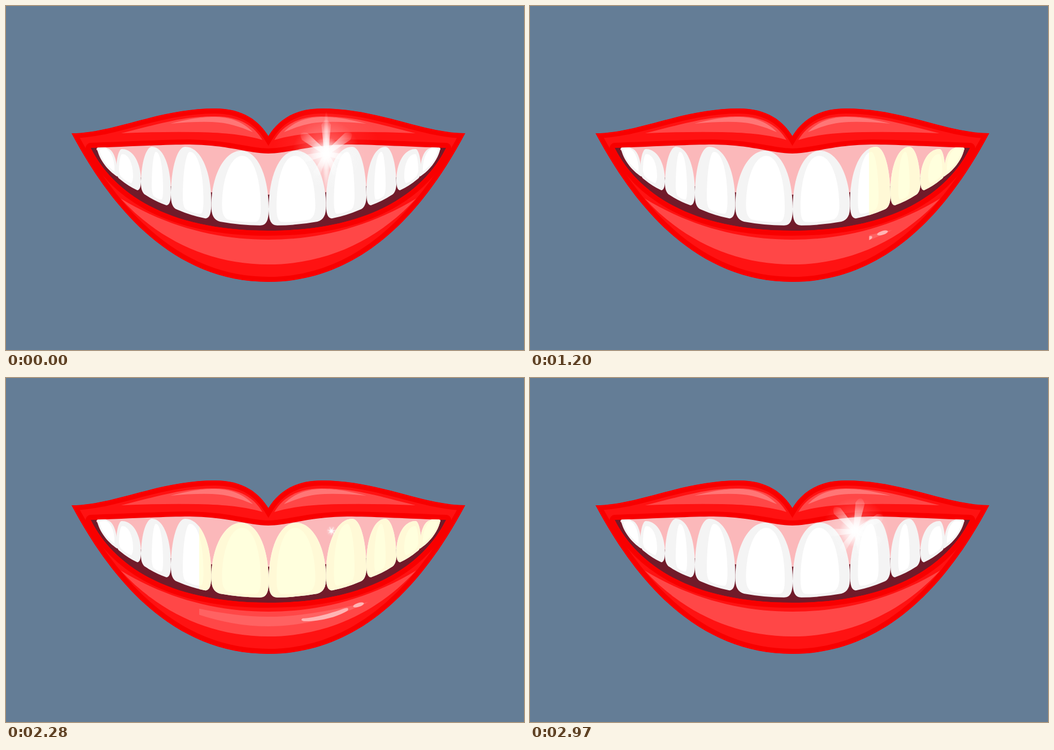
An HTML page for the animation above (3000 ms loop, 917 by 611 pixels).

```html
<!DOCTYPE html>
<html lang="en">
<head>
<meta charset="utf-8">
<title>Smile</title>
<style>
html, body { margin: 0; width: 100%; height: 100%; overflow: hidden; background: #647d96; }
svg { display: block; width: 100%; height: 100%; }
</style>
</head>
<body>
<svg id="stage" viewBox="0 0 917 611" preserveAspectRatio="none"></svg>
<script>
const LOOP = 3000, STEP = 30, CENTER = 464.5;

const fill = (color, d, extra = '') => `<path fill="${color}" d="${d}" ${extra}/>`;
const both = (shape, axis = CENTER) => `${shape}<g transform="translate(${2 * axis} 0) scale(-1 1)">${shape}</g>`;
const flip = ([x, y]) => [2 * CENTER - x, y];
const curve = ([first, ...rest]) => `M${first} C${rest.join(' ')}Z`;

// Closed shape, alike left and right, from the left halves of its upper and lower edge.
function symmetric(top, bottom) {
  const whole = half => [...half, ...half.slice(0, -1).reverse().map(flip)];
  return curve([...whole(top), ...whole(bottom).reverse().slice(1)]);
}

const LIPS = symmetric(
  [[116, 226], [190, 226], [270, 182], [370, 182], [420, 182], [448, 204], [CENTER, 231]],
  [[116, 226], [187, 360], [296, 490], [CENTER, 490]]);
const MOUTH = symmetric(
  [[150, 252], [215, 250], [280, 246], [325, 246], [395, 247], [430, 262], [CENTER, 262]],
  [[150, 252], [186, 324], [274, 399], [CENTER, 399]]);
const GLOSS = symmetric(
  [[203, 342], [290, 395], [380, 415], [CENTER, 415]],
  [[203, 342], [270, 415], [360, 459], [CENTER, 459]]);
const BAND = symmetric(
  [[288, 398], [345, 411], [405, 424], [CENTER, 424]],
  [[288, 398], [335, 422], [400, 441], [CENTER, 441]]);
const GUMS = symmetric(
  [[160, 255], [160, 235], [300, 235], [CENTER, 235]],
  [[160, 255], [230, 330], [380, 335], [CENTER, 335]]);

// Height of the biting edge at x.
const bite = x => 390 - .00039 * Math.abs(465 - x) ** 2.2;

function tooth(l, r, apex, top, lift) {
  const w = r - l, ax = l + w * apex;
  const side = (x, inward) => {
    const foot = x + inward * w * .15, low = bite(foot) - lift;
    return { x, foot, low, near: x + inward * w * .04, hip: low - (low - top) * .22, mid: low - (low - top) * .66 };
  };
  const a = side(l, 1), b = side(r, -1);
  return `M${l},${a.hip} C${l},${a.mid} ${l + (ax - l) * .45},${top} ${ax},${top} ` +
    `C${ax + (r - ax) * .6},${top} ${r},${b.mid} ${r},${b.hip} ` +
    `C${r},${b.low - 9} ${b.near},${b.low} ${b.foot},${b.low} ` +
    `Q${(l + r) / 2},${(a.low + b.low) / 2 + 3} ${a.foot},${a.low} ` +
    `C${a.near},${a.low - 3} ${l},${a.low - 12} ${l},${a.hip}Z`;
}

// left, apex as part of the width, top, inset of the face
const TEETH = [[195, .23, 254, 5], [239, .37, 250, 19], [292, .35, 250, 21], [363.500, .52, 257, 19]];

function teeth(edge, face) {
  const row = TEETH.map(([l, apex, top, inset], i) => {
    const r = TEETH[i + 1]?.[0] ?? 465;
    return fill(edge, tooth(l, r, apex, top, 0)) + fill(face, tooth(l + inset, r - 14, apex, top + 9, 6));
  }).join('');
  const last =
    fill(edge, 'M161,253 C165,273 180,292 197,303 C198,280 192,256 180,253 C170,248 163,249 161,253Z') +
    fill(face, 'M165,255 C168,272 180,285 192,294 C193,275 186,255 175,253Z');
  return both(last + row, 465);
}

const upperGloss = both(
  fill('#ff4747', 'M204,226 C270,210 310,196 370,196 C415,196 440,214 454,238 C425,229 390,225 340,224 Q270,223 204,226Z') +
  fill('#ff7676', 'M291,209 C335,198 350,197 372,197 C405,198 425,211 437,224 C413,214 393,207 365,206 Q330,205 291,209Z'));

const glints =
  fill('#ffb4b4', 'M525,427 C550,426 580,416 600,409 Q608,407 605,413 C585,426 550,433 527,432 Q520,430 525,427Z') +
  '<ellipse cx="624" cy="403" rx="10" ry="3.500" fill="#ffb4b4" transform="rotate(-18 624 403)"/>';

const rays = Array.from({ length: 7 }, (_, i) => {
  const turn = -90 + i * 360 / 7, len = .93 + .13 * Math.cos(i * 2 * Math.PI / 7);
  return `<g transform="rotate(${turn}) scale(${len})">` +
    fill('url(#ray)', 'M0,-.060 L.800,-.130 Q1.080,0 .800,.130 L0,.060Z') + '</g>';
}).join('');

const glow = (id, stops) => `<radialGradient id="${id}" gradientUnits="userSpaceOnUse" cx="0" cy="0" r="1">` +
  stops.map(([at, a]) => `<stop offset="${at}" stop-color="#fff" stop-opacity="${a}"/>`).join('') + '</radialGradient>';

const stage = document.getElementById('stage');
stage.innerHTML = `
  <defs>
    <clipPath id="lips"><path d="${LIPS}"/></clipPath>
    <clipPath id="mouth"><path d="${MOUTH}"/></clipPath>
    <clipPath id="wipe"><rect id="edge" y="0" width="1200" height="611"/></clipPath>
    ${glow('ray', [[0, .8], [.5, .5], [1, 0]])}
    ${glow('core', [[0, 1], [.3, .85], [1, 0]])}
    ${glow('halo', [[0, .45], [.5, .2], [1, 0]])}
  </defs>
  <rect width="917" height="611" fill="#647d96"/>
  <g clip-path="url(#lips)">
    ${fill('#ff1212', LIPS, 'stroke="#f80000" stroke-width="18"')}
    ${upperGloss}${fill('#ff4747', GLOSS)}
    ${fill('#711b2a', MOUTH, 'stroke="#f80000" stroke-width="18" stroke-linejoin="round"')}
  </g>
  <g clip-path="url(#mouth)">
    ${fill('#711b2a', MOUTH)}${fill('#fbb8ba', GUMS)}${teeth('#f4f4f4', '#fff')}
  </g>
  <g clip-path="url(#wipe)">
    ${fill('#ff6262', BAND)}${glints}
    <g clip-path="url(#mouth)">${teeth('#fff9d6', '#ffffdd')}</g>
  </g>
  <g id="spark">
    <circle r="1" fill="url(#halo)"/>
    <g id="rays">${rays}</g>
    <circle r="1" fill="url(#core)" transform="scale(.48)"/>
    <g id="flash">
      <circle r="1" fill="url(#halo)" transform="scale(1.600)" opacity=".3"/>
      <ellipse rx="1" ry="1" fill="url(#ray)" transform="scale(.110 1.250)"/>
    </g>
  </g>`;

const [edge, spark, rayGroup, flash] = ['edge', 'spark', 'rays', 'flash'].map(id => document.getElementById(id));

// The yellow layer is wiped in leftwards, then out again to the right.
const TURN = 1950, SPEED_IN = .646, SPEED_OUT = .685;
const SPARK_START = 2250, SPARK_LIFE = 1890;

function draw() {
  const t = Math.floor(performance.now() % LOOP / STEP) * STEP;
  edge.setAttribute('x', 116 + (t < TURN ? SPEED_IN * (TURN - t) : SPEED_OUT * (t - TURN)));

  const age = (t - SPARK_START + LOOP) % LOOP;
  const life = Math.min(age / SPARK_LIFE, 1);
  const burst = Math.max(0, 1 - t / 300);
  const size = 62 * Math.max(0, Math.sin(Math.PI * life)) ** .62;
  spark.setAttribute('display', size > .1 ? 'inline' : 'none');
  spark.setAttribute('transform', `translate(${576 - 9 * burst} ${272 - 10 * burst}) scale(${size})`);
  rayGroup.setAttribute('transform', `rotate(${29 - .027 * age - 9 * burst})`);
  flash.setAttribute('opacity', burst);
  requestAnimationFrame(draw);
}
draw();
</script>
</body>
</html>
```
